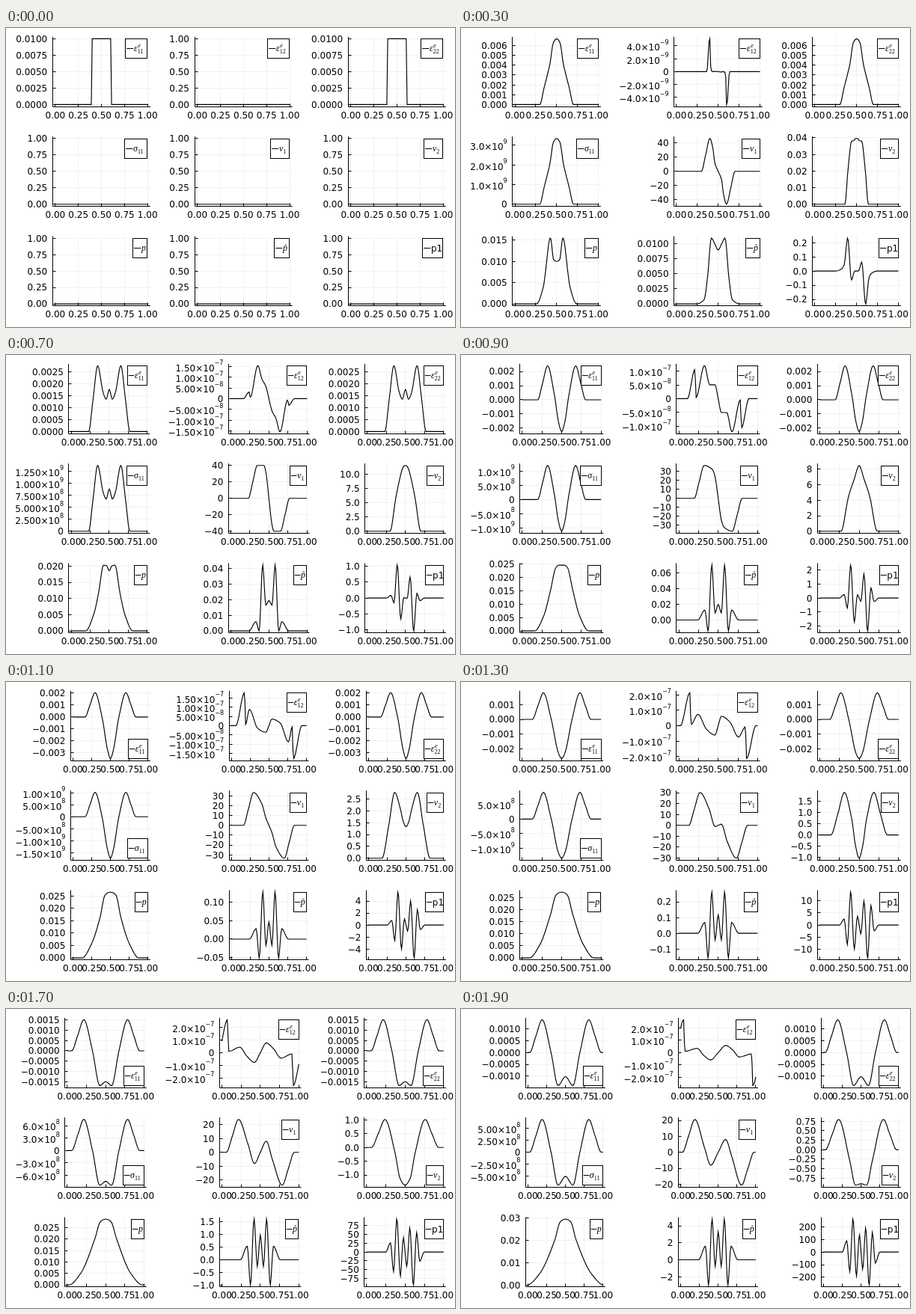
These frames come from a looping animation (600 by 400 pixels, 2000 ms). An HTML page with a canvas:

```html
<!DOCTYPE html>
<html lang="en">
<head>
<meta charset="utf-8">
<title>Wave fields</title>
<style>
html, body { margin: 0; width: 100%; height: 100%; overflow: hidden; background: #fff; }
canvas { display: block; }
</style>
</head>
<body>
<canvas id="stage" width="600" height="400"></canvas>
<script>
const ctx = document.getElementById('stage').getContext('2d');
const STEP_MS = 100, STEPS = 20;
const SANS = '"DejaVu Sans", sans-serif', SERIF = '"Liberation Serif", serif';
const { min, max, exp, log, abs } = Math;

// Piecewise linear value over time; shorter lists use the last key times.
const KEY_TIMES = [0, 3, 7, 9, 11, 15, 19];
function at(t, ...values) {
  const times = KEY_TIMES.slice(-values.length);
  let k = 0;
  while (k < times.length - 2 && times[k + 1] <= t) k++;
  const f = max(0, (t - times[k]) / (times[k + 1] - times[k]));
  return values[k] + (values[k + 1] - values[k]) * f;
}
const atLog = (t, ...values) => exp(at(t, ...values.map(log)));
const onset = t => min(1, t / 3);

// Outgoing wave front: foot, half height and crest move left and widen.
function front(t, height = 100) {
  const half = 39.5 - 1.52 * t, reach = min(.5 + 2 * t, 4.5 + .2 * t);
  return [[half - reach, 0], [half, height / 2], [half + reach, height]];
}
const trough = t => min(46, 61 - 1.1 * t);

// Each field: a peak value and a few moving points (percent) of the left half.
const strain = {
  peak: t => atLog(t, .01, .0067, .00275, .0024, .00203, .00163, .00138),
  points: t => [
    ...front(t, at(t, 100, 51, 100, 100, 100, 100, 100)),
    [min(42, 49.8 - t), at(t, 100, 62, 59, 14, 0, 0, 0)],
    [trough(t), at(t, 100, 94, 49, -65, -133, -122, -101)],
    [50, at(t, 100, 100, 64, -93, -170, -124, -74)]
  ]
};
const stress = { ...strain, peak: t => t ? 5e11 * strain.peak(t) : 0 };
const shear = {
  odd: true,
  peak: t => onset(t) * atLog(t, 5.1e-9, 1.53e-7, 1.2e-7, 1.78e-7, 2.55e-7, 2.65e-7),
  points: t => {
    const spike = at(t, 39.8, 24, 20.4, 17.5, 10.5, 4);
    const bump = at(t, 44, 35.5, 32.5, 24, 24.5, 22), dip = trough(t);
    return [
      [spike - min(t + .5, 12), 0],
      [spike, at(t, 100, 20, 88, 100, 100, 100)],
      [spike + 1.5, 4],
      [bump, at(t, 0, 100, 100, 49, 20, 13)],
      [(bump + dip) / 2, at(t, 0, 60, 42, -8, -14, -9)],
      [dip, at(t, 1, 37, 42, -20, -37, -22)],
      [50, 0]
    ];
  }
};
const velocity1 = {
  odd: true,
  peak: t => onset(t) * (51 - 1.6 * t),
  points: t => [
    ...front(t),
    [min(43.5, 52 - 1.05 * t), at(t, 72, 100, 88, 66, 35, 12)],
    [trough(t), at(t, 25, 80, 66, 22, -29, -39)],
    [50, 0]
  ]
};
const velocity2 = {
  peak: t => onset(t) * atLog(t, .0396, 11.6, 8.5, 2.78, 1.3, .8),
  points: t => {
    const half = at(t, 39.5, 37.3, 36, 27, 19, 11.5);
    const crest = min(44, 55 - 1.83 * t), mid = (crest + 50) / 2;
    return [
      [half - min(t + .5, 9), 0],
      [half, 50],
      [crest, at(t, 96, 78, 61, 100, 100, 100)],
      [mid, at(t, 97, 95, 81, 75, 0, -38)],
      [(mid + 50) / 2, at(t, 100, 99, 93, 56, -104, -117)],
      [50, at(t, 100, 100, 100, 48, -157, -112)]
    ];
  }
};
const pressure = {
  peak: t => onset(t) * atLog(t, .0155, .0203, .0245, .0265, .028, .0295),
  points: t => [
    [31 - 1.7 * t, 0],
    [min(34.4, 38 - 1.2 * t), 28 - .6 * t],
    [36, at(t, 40, 55, 62, 61, 72, 69)],
    [42.5, 95],
    [46.5, at(t, 63, 94, 99, 99, 99, 99)],
    [50, at(t, 61, 87, 99, 100, 100, 100)]
  ]
};
const pressureHat = {
  peak: t => exp(-3.76 - .018 * t + .0157 * t * t) * (1 - exp(-t * t / 16)),
  points: t => [
    [24, 0],
    [33, min(33, 2 * t)],
    [37.2, max(-62, 70 - 10 * t)],
    [41.8, 100],
    [46, max(-16, 130 - 13 * t)],
    [50, max(109 - 9 * t, 4 * t - 8)]
  ]
};
const pressure1 = {
  odd: true,
  peak: t => onset(t) * exp(-2.47 + .32 * t + .0054 * t * t),
  points: t => [
    [25, 0],
    [31, 4 + .08 * t * t],
    [35, max(-58, 42 - 8 * t)],
    [39.3, 100],
    [43.8, -min(72, 9 * t)],
    [47.8, max(0, 4.2 * t - 28)],
    [50, 0]
  ]
};

// Legend marks: base letter, subscript, superscript and text width.
const panels = [
  { data: strain, mark: ['ε', '11', 'e'], width: 14.6 },
  { data: shear, mark: ['ε', '12', 'e'], width: 14.6 },
  { data: strain, mark: ['ε', '22', 'e'], width: 14.6 },
  { data: stress, mark: ['σ', '11'], width: 15.6 },
  { data: velocity1, mark: ['v', '1'], width: 10.6 },
  { data: velocity2, mark: ['v', '2'], width: 10.6 },
  { data: pressure, mark: ['p'], width: 5 },
  { data: pressureHat, mark: ['p'], hat: true, width: 5.5 },
  { data: pressure1, plain: 'p1', width: 12.6 }
];

// Monotone cubic through the points [x, y].
function spline(points) {
  const secant = i => (points[i + 1][1] - points[i][1]) / (points[i + 1][0] - points[i][0]);
  const slopes = points.map((_, i) => {
    if (!i || i === points.length - 1) return 0;
    const a = secant(i - 1), b = secant(i);
    return a * b > 0 ? 2 * a * b / (a + b) : 0;
  });
  return x => {
    let i = 0;
    while (i < points.length - 2 && points[i + 1][0] < x) i++;
    const [x0, y0] = points[i], [x1, y1] = points[i + 1];
    const h = x1 - x0, t = (x - x0) / h, u = 1 - t;
    return u * u * ((1 + 2 * t) * y0 + t * h * slopes[i]) +
           t * t * ((3 - 2 * t) * y1 - u * h * slopes[i + 1]);
  };
}

function sample({ peak, points, odd }, t) {
  const half = [[-100, 0], ...points(t)];
  const mirrored = half.slice(0, -1).reverse().map(([x, y]) => [100 - x, odd ? -y : y]);
  const curve = spline([...half, ...mirrored]);
  const shape = Array.from({ length: 101 }, (_, x) => curve(x));
  const scale = peak(t) / max(...shape);
  return shape.map(y => y * scale);
}

// Scores candidate steps by tick count, coverage and roundness.
function chooseTicks(lo, hi) {
  const span = hi - lo, niceness = [[5, .9], [3, .2], [2.5, .5], [2, .7], [1, 1]];
  let best = [], bestScore = -1;
  const top = Math.ceil(Math.log10(span));
  for (let z = top; z > top - 3; z--) {
    for (const [q, nice] of niceness) {
      const step = q * 10 ** z;
      const first = Math.ceil(lo / step - 1e-9), last = Math.floor(hi / step + 1e-9);
      const count = last - first + 1;
      if (count < 4 || count > 8) continue;
      const score = (1 - abs(count - 5) / 5) / 4 + span / (count - 1) / step / 2 + nice / 4;
      if (score > bestScore + 1e-6) {
        bestScore = score;
        best = Array.from({ length: count }, (_, i) => (first + i) * step);
      }
    }
  }
  return best;
}

function decimals(v) {
  let d = 0;
  while (d < 8 && abs(v * 10 ** d - Math.round(v * 10 ** d)) > 1e-6) d++;
  return d;
}

// Each label is a pair: text and exponent.
function formatTicks(ticks) {
  const largest = max(...ticks.map(abs));
  const minus = s => s.replace('-', '−');
  if (largest >= 1e-4 && largest < 1e6) {
    const d = max(...ticks.map(decimals));
    return ticks.map(v => [minus((v || 0).toFixed(d)), '']);
  }
  const parts = ticks.map(v => {
    const e = v ? Math.floor(Math.log10(abs(v)) + 1e-9) : 0;
    return [v / 10 ** e, e];
  });
  const d = 1 + max(...parts.map(([m]) => decimals(m)));
  return parts.map(([m, e]) => m ? [minus(m.toFixed(d)) + '×10', minus(String(e))] : ['0', '']);
}

function text(s, x, y, font, align = 'left') {
  ctx.font = font;
  ctx.textAlign = align;
  ctx.fillText(s, x, y);
}

function textWidth(s, size) {
  ctx.font = `${size}px ${SANS}`;
  return ctx.measureText(s).width;
}

const labelWidth = ([base, sup]) => textWidth(base, 12) + (sup && textWidth(sup, 8) - 1);

function line(points, color = '#000') {
  ctx.strokeStyle = color;
  ctx.beginPath();
  for (const [x, y] of points) ctx.lineTo(x, y);
  ctx.stroke();
}

const crisp = v => Math.floor(v) + .5;

function drawLegend({ mark, plain, hat, width }, right, top, bottom, w, atBottom) {
  const boxWidth = width + .11 * w, boxHeight = 26;
  const x = crisp(right - .03 * w - boxWidth);
  const y = crisp(atBottom ? bottom - 3 - boxHeight : top + 3);
  const mid = y + boxHeight / 2, tx = x + .088 * w;
  ctx.fillStyle = '#fff';
  ctx.fillRect(x, y, boxWidth, boxHeight);
  ctx.strokeStyle = '#000';
  ctx.strokeRect(x, y, Math.round(boxWidth), boxHeight);
  line([[x + .012 * w, mid], [x + .083 * w, mid]]);
  ctx.fillStyle = '#000';
  if (plain) return text(plain, tx, mid + 4.4, `12px ${SANS}`);
  const [base, sub = '', sup = ''] = mark;
  text(base, tx, mid + 3, `italic 12px ${SERIF}`);
  const subX = tx + ctx.measureText(base).width;
  text(sub, subX, mid + 6, `8px ${SERIF}`);
  text(sup, subX + .5, mid - 2, `italic 8px ${SERIF}`);
  if (hat) text('ˆ', tx + 2, mid + 2, `10px ${SERIF}`);
}

function drawPanel(panel, left, w, top) {
  const { values, lo, hi, ticks, labels, atBottom } = panel;
  const height = 93.2, bottom = top + height;
  const px = u => left + w * (u + .03) / 1.06;
  const py = v => bottom - height * (v - lo) / (hi - lo);
  const axisX = crisp(left), axisY = crisp(bottom);
  const xTicks = [0, .25, .5, .75, 1];
  ctx.lineWidth = 1;
  for (const u of xTicks) line([[crisp(px(u)), top], [crisp(px(u)), bottom]], '#f1f1f1');
  for (const v of ticks) line([[left, crisp(py(v))], [left + w, crisp(py(v))]], '#f1f1f1');
  line([[axisX, top], [axisX, axisY], [left + w, axisY]]);
  ctx.fillStyle = '#000';
  for (const u of xTicks) {
    const x = crisp(px(u));
    line([[x, axisY], [x, axisY - 4]]);
    text(u.toFixed(2), px(u), bottom + 15.7, `12px ${SANS}`, 'center');
  }
  ticks.forEach((v, i) => {
    const y = py(v), [base, sup] = labels[i];
    line([[axisX, crisp(y)], [axisX + 4, crisp(y)]]);
    const supX = left - 7 - textWidth(sup, 8);
    text(base, supX, y + (sup ? 6.4 : 4.4), `12px ${SANS}`, 'right');
    text(sup, supX, y - 2, `8px ${SANS}`);
  });
  ctx.lineWidth = 1.15;
  line(values.map((v, i) => [px(i / 100), py(v)]));
  ctx.lineWidth = 1;
  drawLegend(panel, left + w, top, bottom, w, atBottom);
}

function measurePanel(panel, t) {
  const values = sample(panel.data, t);
  let low = min(...values), high = max(...values);
  if (high === low) { low = 0; high = 1; }
  const range = high - low, lo = low - .03 * range, hi = high + .03 * range;
  const ticks = chooseTicks(lo, hi), labels = formatTicks(ticks);
  return { ...panel, values, lo, hi, ticks, labels, atBottom: low + high < -.001 * range };
}

function draw(t) {
  ctx.fillStyle = '#fff';
  ctx.fillRect(0, 0, 600, 400);
  const measured = panels.map(p => measurePanel(p, t));
  const padLeft = [0, 1, 2].map(col => 20.2 + max(
    ...measured.filter((_, i) => i % 3 === col).flatMap(p => p.labels.map(labelWidth))));
  const padRight = 12.2;
  const w = (600 - 3 * padRight - padLeft[0] - padLeft[1] - padLeft[2]) / 3;
  let x = 0;
  padLeft.forEach((pad, col) => {
    x += pad;
    for (let row = 0; row < 3; row++) drawPanel(measured[row * 3 + col], x, w, 11.8 + row * 133.35);
    x += w + padRight;
  });
}

let shown = -1;
function tick() {
  const step = Math.floor(performance.now() / STEP_MS) % STEPS;
  if (step !== shown) draw(shown = step);
  requestAnimationFrame(tick);
}
tick();
</script>
</body>
</html>
```
